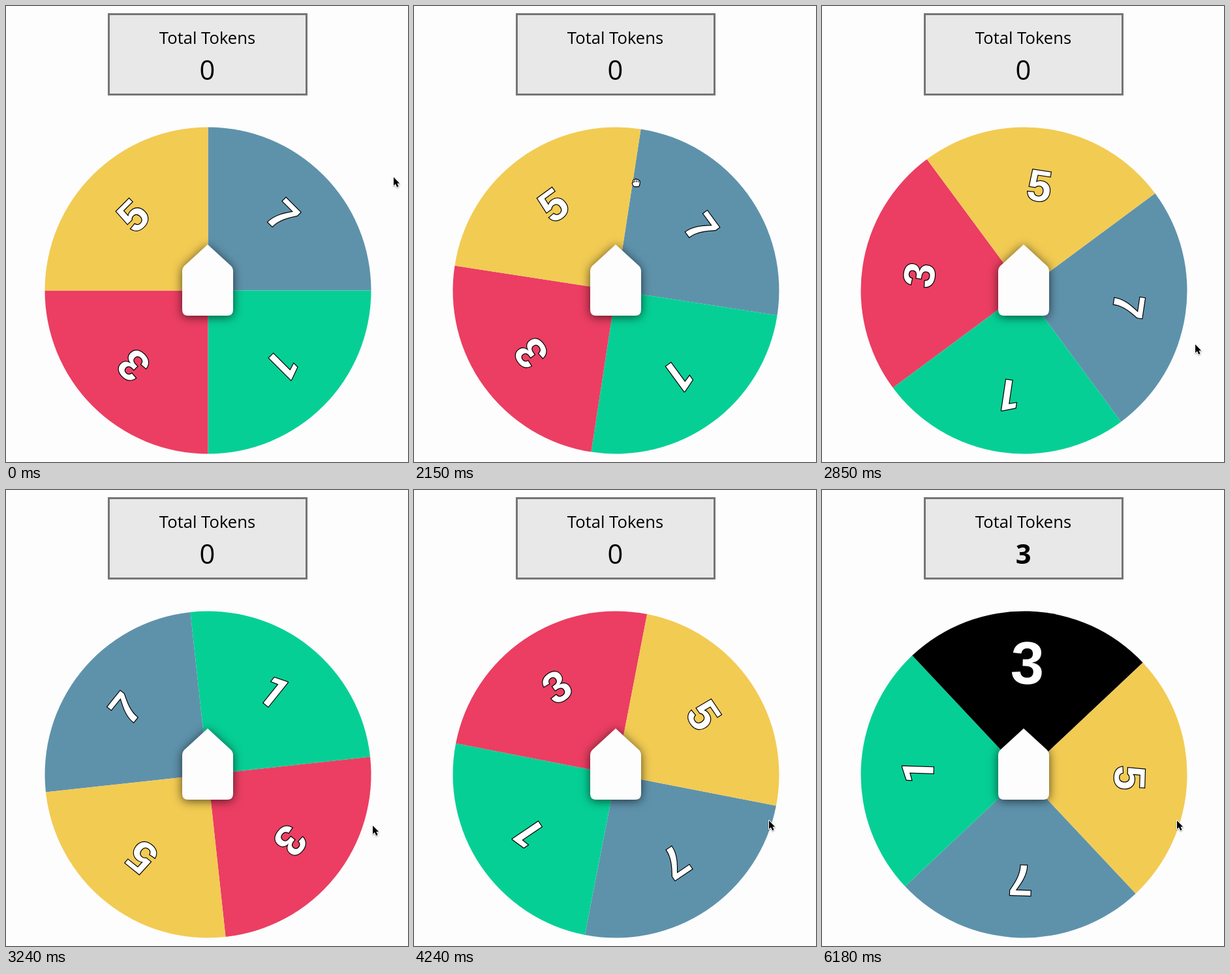
Animation of 616 by 698 pixels, one loop 6.21 s. Source, as an HTML page with a canvas:

```html
<!DOCTYPE html>
<html lang="en">
<head>
<meta charset="utf-8">
<title>Token wheel</title>
<style>
html, body { margin: 0; width: 100%; height: 100%; overflow: hidden; background: #fdfdfd; }
canvas { display: block; }
</style>
</head>
<body>
<canvas id="stage" width="616" height="698"></canvas>
<script>
const ctx = document.getElementById('stage').getContext('2d');
const LOOP = 6210, CX = 309.5, CY = 435.5, R = 250, RAD = Math.PI / 180;
const DRAG = 2030, RELEASE = 2523, STOP = 4987;
const SANS = '"Liberation Sans", Arial, sans-serif';
// Label, colour, font (Roboto's 1 has no foot)
const wedges = [
  ['7', '#5e92ab', SANS],
  ['1', '#06cf95', 'Roboto, sans-serif'],
  ['3', '#eb3e62', SANS],
  ['5', '#f2cb53', SANS]
];
const winner = '3';

const clamp = u => Math.min(1, Math.max(0, u));
const span = (t, a, b) => clamp((t - a) / (b - a));
const smooth = u => u * u * (3 - 2 * u);
const mix = (a, b, u) => a + (b - a) * u;

// Share of the hand drag that is done
const pull = t => Math.pow(Math.max(0, t - DRAG) / 490, 1.77);

// Wheel angle in degrees: dragged by hand, then slowed by friction
function wheelAngle(t) {
  if (t < RELEASE) return 105.6 * pull(t);
  return 872.8 - 249 * Math.exp(-1.57 * (Math.min(t, STOP) - 3240) / 1000);
}

function drawPanel(done) {
  ctx.fillStyle = '#e8e8e8';
  ctx.strokeStyle = '#757575';
  ctx.lineWidth = 3;
  ctx.fillRect(157.5, 12.5, 303, 123);
  ctx.strokeRect(157.5, 12.5, 303, 123);
  ctx.fillStyle = '#000';
  ctx.textAlign = 'center';
  ctx.font = '25.6px "Open Sans", "Noto Sans", sans-serif';
  ctx.fillText('Total Tokens', 308.5, 58);
  ctx.font = (done ? 'bold ' : '') + '41.6px "Open Sans", "Noto Sans", sans-serif';
  ctx.fillText(done ? winner : '0', 308.5, 113);
}

function drawWheel(angle, done) {
  ctx.save();
  ctx.translate(CX, CY);
  ctx.rotate((angle + 45) * RAD);
  ctx.strokeStyle = '#000';
  ctx.lineWidth = 2.4;
  for (const [label, color, font] of wedges) {
    const won = done && label === winner;
    ctx.beginPath();
    ctx.moveTo(0, 0);
    ctx.arc(0, 0, R, -135 * RAD, -45 * RAD);
    ctx.closePath();
    ctx.fillStyle = won ? '#000' : color;
    ctx.fill();
    ctx.font = `bold ${won ? 92 : 67}px ${font}`;
    ctx.fillStyle = '#fff';
    ctx.strokeText(label, 0, -139);
    ctx.fillText(label, 0, -139);
    ctx.rotate(90 * RAD);
  }
  ctx.restore();
}

const pointer = new Path2D('M309 365L345 398Q348 401 348 405V465Q348 474 339 474H279Q270 474 270 465V405Q270 401 273 398Z');
function drawPointer() {
  ctx.save();
  ctx.shadowColor = 'rgba(0,0,0,.65)';
  ctx.shadowBlur = 15;
  ctx.shadowOffsetY = 2;
  ctx.fillStyle = '#fdfdfd';
  ctx.fill(pointer);
  ctx.restore();
}

function cursorAt(t) {
  if (t < DRAG) {
    const u = smooth(span(t, 250, 1050));
    return [mix(594, 314.3, u), mix(262, 270, u)];
  }
  if (t < RELEASE) {
    const u = pull(t), a = (105.6 * u + 1.85) * RAD, r = 165 + 111 * Math.pow(u, 1.5);
    return [CX + r * Math.sin(a), CY - r * Math.cos(a)];
  }
  const u = span(t, 3200, 3312);
  return [mix(572, 544, u), mix(518, 506, u)];
}

const arrow = new Path2D('M0 0V13L2.9 10.3L5.2 15.2L7.6 14.1L5.4 9.4H9.2Z');
const fist = new Path2D('M-5 -3Q-4 -6 -2 -5Q0 -7 1 -5Q3 -6 4 -4Q6 -4 6 -1Q6 3 4 6H-3Q-6 3 -6 1Q-6 -1 -4 -1Z');
const fingers = new Path2D('M-2 -4V-1M1 -4V-1M3.7 -3V-1');
const openHand = new Path2D('M-4 -1L-5 -5Q-4 -7 -3 -5L-2 -2V-7Q-1 -9 0 -7V-2L1 -7Q3 -8 3 -6V-1L4 -5Q6 -6 6 -4Q6 3 4 7H-3Q-5 4 -7 1Q-7 -1 -4 1Z');

function drawCursor(t) {
  const [x, y] = cursorAt(t);
  const onWheel = t < RELEASE && Math.hypot(x - CX, y - CY) < R;
  ctx.save();
  ctx.translate(x, y);
  ctx.lineJoin = 'round';
  if (onWheel) {
    const hand = t < DRAG ? openHand : fist;
    ctx.fillStyle = '#fff';
    ctx.strokeStyle = '#000';
    ctx.lineWidth = 1.2;
    ctx.fill(hand);
    ctx.stroke(hand);
    if (hand === fist) ctx.stroke(fingers);
  } else {
    ctx.fillStyle = '#000';
    ctx.strokeStyle = '#fff';
    ctx.lineWidth = 2;
    ctx.shadowColor = 'rgba(0,0,0,.35)';
    ctx.shadowBlur = 2;
    ctx.shadowOffsetY = 1;
    ctx.stroke(arrow);
    ctx.shadowColor = 'transparent';
    ctx.fill(arrow);
  }
  ctx.restore();
}

let start;
function draw(now) {
  start ??= now;
  const t = (now - start) % LOOP, done = t >= STOP;
  ctx.fillStyle = '#fdfdfd';
  ctx.fillRect(0, 0, 616, 698);
  drawPanel(done);
  drawWheel(wheelAngle(t), done);
  drawPointer();
  drawCursor(t);
  requestAnimationFrame(draw);
}
requestAnimationFrame(draw);
</script>
</body>
</html>
```
